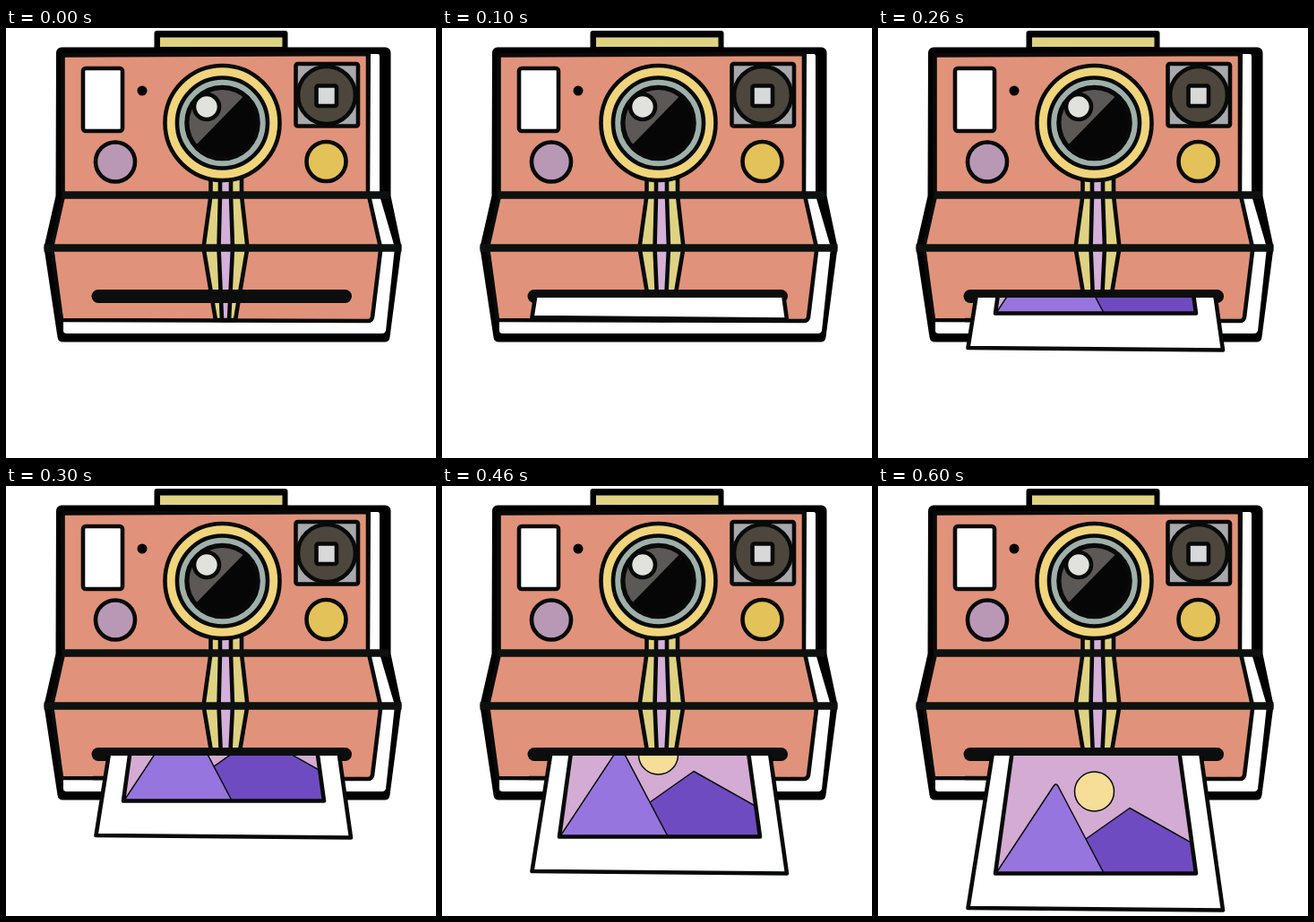
These frames come from a looping animation (480 px wide and 480 px high, 700 ms). An HTML page:

```html
<!DOCTYPE html>
<html lang="en">
<head>
<meta charset="utf-8">
<title>Instant camera</title>
<style>
html, body { margin: 0; width: 100%; height: 100%; overflow: hidden; background: #fff; }
svg { display: block; width: 100vw; height: 100vh; }
.line { stroke: #080a09; stroke-width: 4.6; stroke-linejoin: round; }
.thin { stroke: #080a09; stroke-width: 1.5; stroke-linejoin: round; }
.salmon { fill: #e0937a; }
.yellow { fill: #dfd282; }
.pink { fill: #d4abd2; }
</style>
</head>
<body>
<svg viewBox="0 0 480 480">
  <defs>
    <clipPath id="below"><rect y="301" width="480" height="179"/></clipPath>
    <clipPath id="glass"><circle cx="241.500" cy="106" r="37"/></clipPath>
    <clipPath id="frame"><path d="M157 244L131 432H355L329 244Z"/></clipPath>
  </defs>

  <!-- body -->
  <rect x="165.500" y="3" width="149" height="28" rx="3"/>
  <rect class="yellow" x="172" y="10.500" width="136.500" height="10.500"/>
  <path stroke="#000" stroke-width="12" stroke-linejoin="round"
    d="M62 27.500H423.500V188L435.500 245L422.500 344.500H63.500L48.500 245L61.500 188Z"/>
  <path fill="#fff" d="M407 29H415Q417 29 417 32V187L434 245L424 338Q423 341 420 341H68Q64 341 64 338V328H405Z"/>
  <path class="salmon line" d="M65 30.500L404 29V187H63.500V33Q63.500 30.500 66 30.500Z"/>
  <path class="salmon line" d="M64 187H405L418 245H51Z"/>
  <path class="salmon line" d="M51 245H418.500L409 323Q408 327 404 327L62 326Z"/>

  <!-- stripes -->
  <g class="line">
    <path class="yellow" d="M228.500 165V187L220.500 245L234 326H256L269.500 245L263 187V165Z"/>
    <path fill="#d5b0da" d="M239 165V187L237.500 245L241 326H249L253 245L251 187V165Z"/>
  </g>
  <path d="M63 186.500H427M42.500 245.500H441.500" fill="none" stroke="#0d110f" stroke-width="8.500"/>

  <!-- controls -->
  <g class="line">
    <rect x="86" y="45" width="44" height="70" rx="3" fill="#fff"/>
    <circle cx="122" cy="149.500" r="22" fill="#b998b6"/>
    <circle cx="357.500" cy="149" r="22" fill="#e3c25a"/>
    <rect x="323.500" y="40" width="69.500" height="69.500" rx="2" fill="#a9a9ad"/>
    <circle cx="358" cy="75" r="32" fill="#4c463c"/>
    <rect x="346.500" y="64.500" width="22.500" height="22.500" rx="2" fill="#d8d8d8"/>
  </g>
  <circle cx="152" cy="70" r="5.500"/>

  <!-- lens -->
  <g class="line">
    <circle cx="241.500" cy="106" r="64" fill="#f0d57c"/>
    <circle cx="241.500" cy="106" r="50.500" fill="#9fb0ab"/>
    <circle cx="241.500" cy="106" r="40" fill="#060606"/>
  </g>
  <path clip-path="url(#glass)" fill="#5b5856" d="M200 60H281L200 143Z"/>
  <circle class="line" cx="224" cy="88" r="14" fill="#e2e2dc"/>

  <path d="M103 299.500H378.500" stroke="#0b0e0d" stroke-width="15" stroke-linecap="round"/>

  <!-- print -->
  <g clip-path="url(#below)">
    <g id="print">
      <path class="line" fill="#fff" d="M136.500 244L100.500 471L385 473.500L352.500 244Z"/>
      <g clip-path="url(#frame)">
        <rect class="pink" x="120" y="240" width="245" height="195"/>
        <circle class="thin" cx="241.500" cy="341" r="22" fill="#f6dd98"/>
        <path class="thin" fill="#6f4bc2" d="M220 402.500L281 359.500L360 404V440H220Z"/>
        <path class="thin" fill="#9775de" d="M132 432L196 335Q198.500 331 201 335L252 432Z"/>
      </g>
      <path class="line" fill="none" d="M157 244L131 432.500H355L329 244Z"/>
    </g>
  </g>
</svg>
<script>
const print = document.getElementById("print");
// Height of the print above its resting place, one value per 100 ms step
const lift = [200, 148, 114, 81, 41, 4, 0];

function draw() {
  const step = Math.floor(performance.now() / 100) % lift.length;
  print.setAttribute("transform", `translate(0 ${-lift[step]})`);
  requestAnimationFrame(draw);
}
draw();
</script>
</body>
</html>
```
